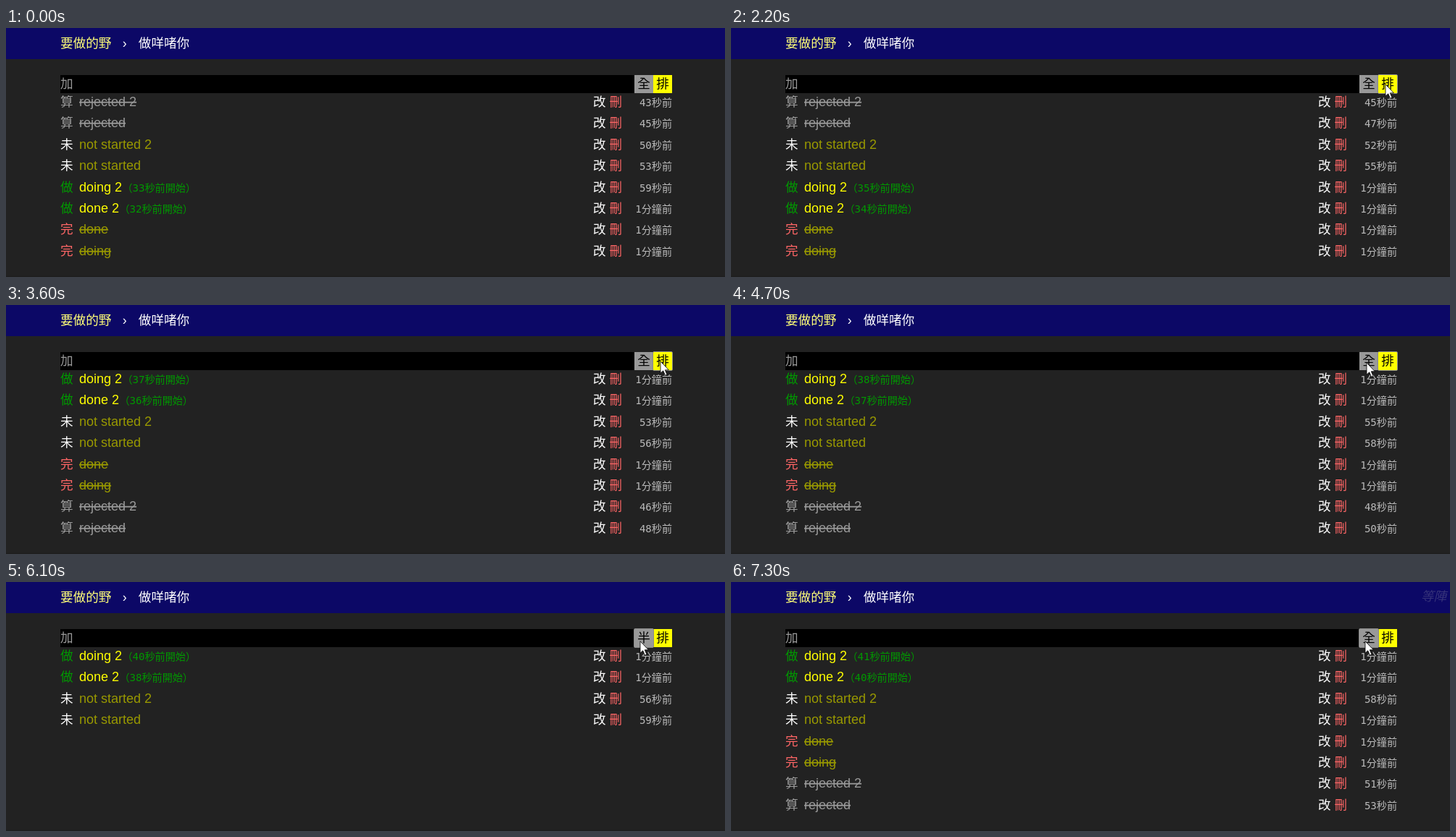
An HTML page that plays this animation: 992x344 px, repeating every 8000 ms.

```html
<!DOCTYPE html>
<html lang="zh-HK">
<head>
<meta charset="utf-8">
<title>要做的野</title>
<style>
html, body { margin: 0; width: 100%; height: 100%; overflow: hidden; background: #222; }
svg { display: block; }
text { font: 17.6px "Liberation Sans", "Noto Sans CJK HK", "Noto Sans CJK TC", "Noto Sans CJK JP", "Noto Sans CJK", sans-serif; white-space: pre; }
.name { font-size: 18px; }
.small { font: 14.08px "DejaVu Sans Mono", "Noto Sans CJK HK", "Noto Sans CJK TC", "Noto Sans CJK JP", "Noto Sans CJK", monospace; }
.strike { text-decoration: line-through; }
.slanted { font-style: italic; }
</style>
</head>
<body>
<svg id="stage" width="992" height="344" viewBox="0 0 992 344"></svg>
<script>
const LOOP = 8000;
const stage = document.getElementById('stage');

function add(parent, tag, attrs, content) {
  const el = document.createElementNS('http://www.w3.org/2000/svg', tag);
  for (const key in attrs) el.setAttribute(key, attrs[key]);
  if (content !== undefined) el.textContent = content;
  parent.appendChild(el);
  return el;
}
const rect = (x, y, width, height, fill) => add(stage, 'rect', { x, y, width, height, fill });
const label = (parent, x, y, fill, content, more) => add(parent, 'text', { x, y, fill, ...more }, content);
const show = (el, on) => el.setAttribute('visibility', on ? 'visible' : 'hidden');
const setText = (el, s) => { if (el.textContent !== s) el.textContent = s; };

// Header and toolbar
rect(0, 0, 992, 344, '#222');
rect(0, 342, 992, 2, '#1f1f1f');
rect(0, 0, 992, 43, '#0c0866');
label(stage, 75, 27, '#ff7', '要做的野');
label(stage, 163.8, 27, '#fff', '›', { 'text-anchor': 'middle' });
label(stage, 182.8, 27, '#fff', '做咩啫你');
const loading = label(stage, 952, 26, '#36337a', '等陣', { class: 'slanted' });
rect(75, 65, 844, 25, '#000');
label(stage, 75, 83, '#999', '加');
rect(867, 65, 26, 25, '#999');
rect(893, 65, 26, 25, '#ff0');
const filterText = label(stage, 871.2, 83, '#000', '全');
label(stage, 897.2, 83, '#000', '排');
const ring = add(stage, 'rect', { y: 64.5, width: 27, height: 26, rx: 1.5, fill: 'none', stroke: '#888' });

// Tasks
const STATES = {
  rejected: { mark: '算', markColor: '#999', color: '#999', done: true },
  waiting: { mark: '未', markColor: '#fff', color: '#990' },
  doing: { mark: '做', markColor: '#090', color: '#ff0' },
  done: { mark: '完', markColor: '#f66', color: '#990', done: true }
};
const TICKS = [0, 600, 1600, 2300, 3600, 4600, 6100, 7100];
const AGE = [0, 1, 2, 3, 3, 5, 6, 8];

// sorted: row after sorting; age: seconds since creation at loop start
const tasks = [
  { name: 'rejected 2', state: 'rejected', sorted: 6, age: 43 },
  { name: 'rejected', state: 'rejected', sorted: 7, age: 45 },
  { name: 'not started 2', state: 'waiting', sorted: 2, age: 50 },
  { name: 'not started', state: 'waiting', sorted: 3, age: 53 },
  { name: 'doing 2', state: 'doing', sorted: 0, age: 59, noteX: 160.5, began: [33, 34, 35, 36, 37, 38, 40, 41] },
  { name: 'done 2', state: 'doing', sorted: 1, age: 60, noteX: 156.5, began: [32, 33, 34, 35, 36, 37, 38, 40] },
  { name: 'done', state: 'done', sorted: 4, age: 70 },
  { name: 'doing', state: 'done', sorted: 5, age: 75 }
];

for (const task of tasks) {
  const s = STATES[task.state];
  const g = task.row = add(stage, 'g', {});
  label(g, 75, 0, s.markColor, s.mark);
  label(g, 101, 0, s.color, task.name, { class: s.done ? 'name strike' : 'name' });
  if (task.began) task.note = label(g, task.noteX, 0, '#090', '', { class: 'small' });
  label(g, 810, 0, '#fff', '改');
  label(g, 832.6, 0, '#f66', '刪');
  task.time = label(g, 919, 0, '#bbb', '', { class: 'small', 'text-anchor': 'end' });
}

const cursor = add(stage, 'path', {
  d: 'M1 .8V17.2L4.7 13.8L7.6 20.3L10 19.2L7.3 12.8H12.4Z',
  fill: '#fff', stroke: '#000', 'stroke-width': .8, 'stroke-linejoin': 'round'
});

// time, x, y of the pointer
const PATH = [
  [400, 888, 328], [600, 889, 222], [800, 893, 116], [900, 896, 90], [1000, 898, 79],
  [1200, 902, 77], [4200, 902, 77], [4300, 900, 77], [4500, 885, 78], [4700, 876, 79],
  [5400, 876, 79], [5600, 874, 81], [LOOP, 874, 81]
];

function pointerAt(t) {
  const i = Math.max(1, PATH.findIndex(p => p[0] > t));
  const [t0, x0, y0] = PATH[i - 1], [t1, x1, y1] = PATH[i];
  const k = (t - t0) / (t1 - t0);
  return [Math.round(x0 + (x1 - x0) * k), Math.round(y0 + (y1 - y0) * k)];
}

const within = (t, a, b) => t >= a && t < b;
const ageText = s => s < 60 ? s + '秒前' : '1分鐘前';

function draw(time) {
  const t = Math.floor(time / 100) * 100;
  const tick = TICKS.filter(x => x <= t).length - 1;
  const sorted = t >= 2300;
  const half = within(t, 4900, 7300);

  tasks.forEach((task, i) => {
    const row = sorted ? task.sorted : i;
    task.row.setAttribute('transform', `translate(0 ${Math.round(108 + 29.4 * row)})`);
    show(task.row, !half || row < 4);
    setText(task.time, ageText(task.age + AGE[tick]));
    if (task.note) setText(task.note, `（${task.began[tick]}秒前開始）`);
  });

  setText(filterText, half ? '半' : '全');
  show(loading, within(t, 2300, 3600) || within(t, 4900, 6100) || t >= 7300);
  show(ring, t >= 2200);
  ring.setAttribute('x', t < 4800 ? 892.5 : 866.5);
  show(cursor, t >= 400);
  if (t >= 400) cursor.setAttribute('transform', `translate(${pointerAt(t)})`);
}

const start = performance.now();
function frame() {
  draw((performance.now() - start) % LOOP);
  requestAnimationFrame(frame);
}
frame();
</script>
</body>
</html>
```
